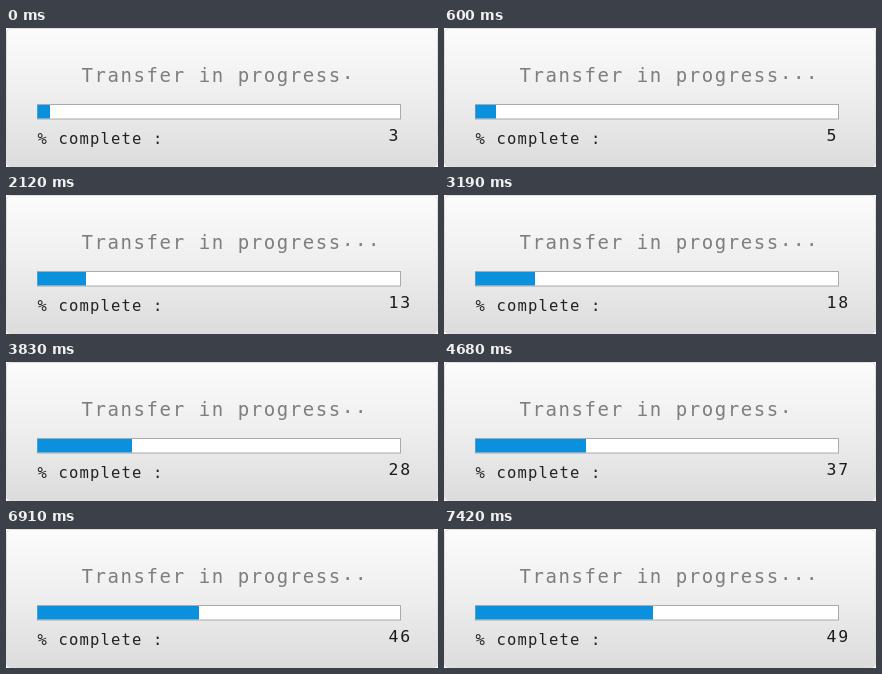
Recreate the animation shown at these times as an HTML page. Size 432 px wide and 139 px high, loop 8000 ms.

```html
<!DOCTYPE html>
<html lang="en">
<head>
<meta charset="utf-8">
<title>Transfer in progress</title>
<style>
  html, body { margin: 0; width: 100%; height: 100%; overflow: hidden; background: #fff; }
  svg { display: block; width: 432px; height: 139px; }
  text { font-family: "DejaVu Sans Mono", monospace; white-space: pre; }
  #title { font-size: 19px; letter-spacing: 1.58px; fill: #7e7e7e; }
  #label { font-size: 15.5px; letter-spacing: 1.17px; fill: #222; }
  #count { font-size: 16.5px; letter-spacing: 1.7px; fill: #1c1c1c; }
</style>
</head>
<body>
<svg viewBox="0 0 432 139">
  <defs>
    <linearGradient id="panel" x1="0" y1="0" x2="0" y2="1">
      <stop offset="0" stop-color="#fcfcfc"/>
      <stop offset="0.5" stop-color="#eee"/>
      <stop offset="1" stop-color="#dcdcdc"/>
    </linearGradient>
  </defs>
  <rect x="0.5" y="0.5" width="431" height="138" rx="4" fill="url(#panel)" stroke="#dedede"/>
  <text id="title" x="75.5" y="54">Transfer in progress<tspan id="dots" dy="-3"></tspan></text>
  <rect x="31.5" y="76.5" width="363" height="14.5" fill="#fff" stroke="#aaa"/>
  <rect id="bar" x="31.5" y="77" height="13.5" fill="#0a90dc"/>
  <text id="label" x="31.5" y="116">% complete :</text>
  <text id="count" x="382.5" y="112.5"></text>
</svg>
<script>
  const LOOP = 8000;
  const BAR_LEFT = 31.5;

  // Uneven pauses between updates, in ms; the last step lasts until the loop ends
  const pauses = [100, 500, 550, 320, 650, 650, 170, 250, 240, 400, 490, 360, 450, 450, 400, 930, 510];

  // Key points by step: [step, percentage, right edge of the bar]
  const keys = [
    [0, 3, 44], [2, 5, 52], [5, 13, 80], [8, 18, 91],
    [10, 28, 126], [12, 37, 142], [14, 41, 162], [17, 49, 209]
  ];

  const [dots, bar, count] = ["dots", "bar", "count"].map(id => document.getElementById(id));

  function stepAt(time) {
    let step = 0;
    while (step < pauses.length && time >= pauses[step]) time -= pauses[step++];
    return step;
  }

  function valuesAt(step) {
    const next = Math.max(1, keys.findIndex(key => key[0] >= step));
    const a = keys[next - 1], b = keys[next];
    const f = (step - a[0]) / (b[0] - a[0]);
    return [1, 2].map(i => Math.round(a[i] + (b[i] - a[i]) * f));
  }

  function render(time) {
    const step = stepAt(time % LOOP);
    const [percent, edge] = valuesAt(step);
    dots.textContent = ".".repeat(step % 3 + 1);
    bar.setAttribute("width", edge - BAR_LEFT);
    count.textContent = percent;
  }

  const start = performance.now();
  function tick() {
    render(performance.now() - start);
    requestAnimationFrame(tick);
  }
  tick();
</script>
</body>
</html>
```
